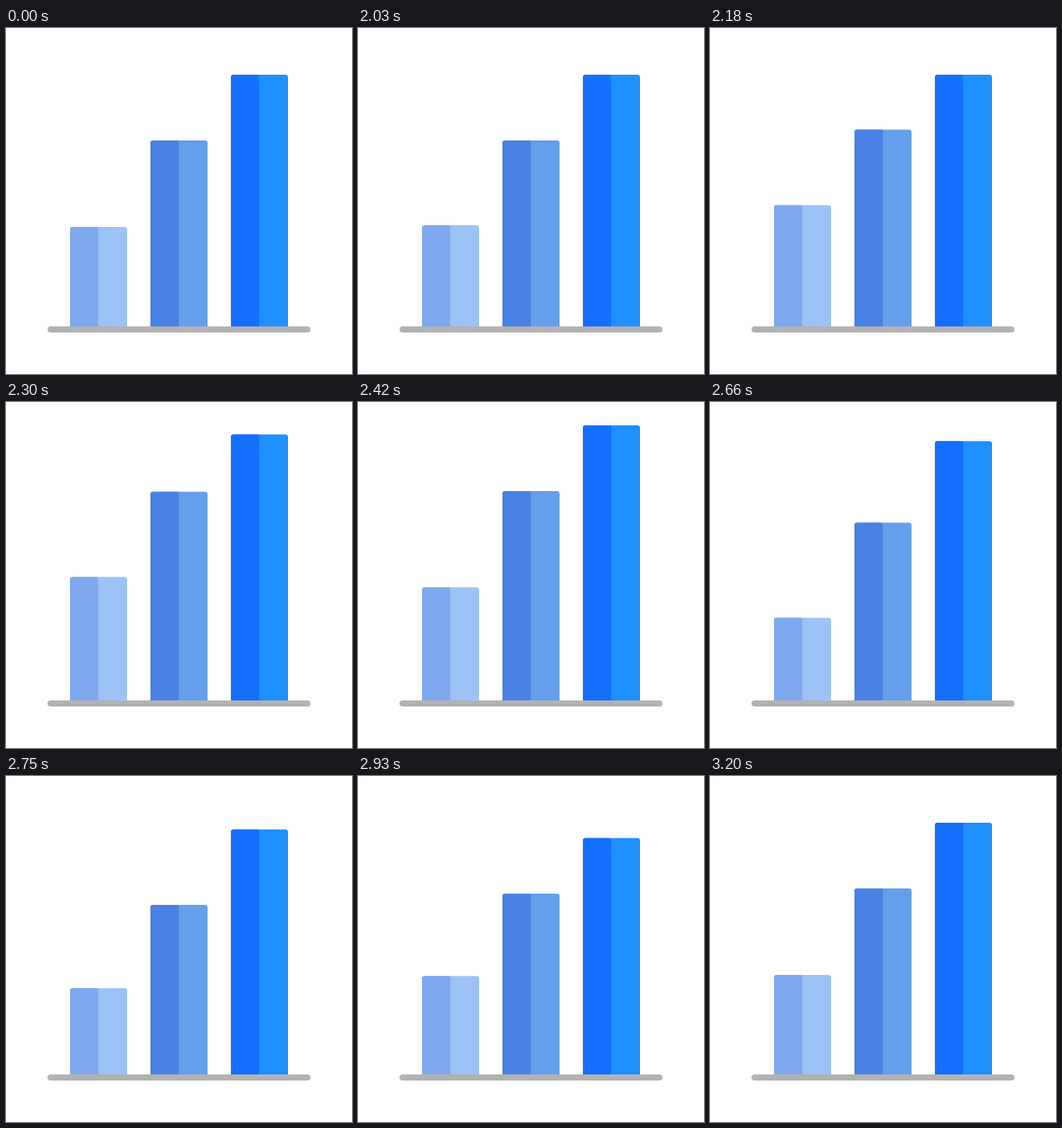
Recreate the animation shown at these times as an HTML page with a canvas. Size 400 by 400 pixels, loop 3230 ms.

```html
<!DOCTYPE html>
<html lang="en">
<head>
<meta charset="utf-8">
<title>Bar chart</title>
<style>
  html, body { margin: 0; height: 100%; overflow: hidden; background: #fff; }
  canvas { display: block; }
</style>
</head>
<body>
<canvas id="stage" width="400" height="400"></canvas>
<script>
const ctx = document.getElementById('stage').getContext('2d');
const LOOP = 3230, STEP = 30, FLOOR = 346;

const bars = [
  { x: 74, top: 230, start: 2000, dark: '#7ea9ee', light: '#9dc2f5' },
  { x: 167, top: 130, start: 2100, dark: '#4982e4', light: '#669eeb' },
  { x: 260, top: 54, start: 2200, dark: '#146fff', light: '#1e90ff' }
];

// Each bar stretches up, dips below its height, then settles.
const keys = [
  { t: 0, y: 0, ease: bezier(.25, .23) },
  { t: 285, y: -28, ease: bezier(.37, .63) },
  { t: 685, y: 20, ease: bezier(.25, .23) },
  { t: 1030, y: 0 }
];

// Cubic easing with control points (x1, 0) and (x2, 1).
function bezier(x1, x2) {
  return x => {
    let lo = 0, hi = 1, s;
    for (let i = 0; i < 20; i++) {
      s = (lo + hi) / 2;
      const r = 1 - s;
      if (3 * r * r * s * x1 + 3 * r * s * s * x2 + s ** 3 < x) lo = s;
      else hi = s;
    }
    return s * s * (3 - 2 * s);
  };
}

function offset(t) {
  const i = keys.findIndex(k => t < k.t);
  if (i < 1) return 0;
  const a = keys[i - 1], b = keys[i];
  return a.y + (b.y - a.y) * a.ease((t - a.t) / (b.t - a.t));
}

function box(x, y, w, h, radii, color) {
  ctx.fillStyle = color;
  ctx.beginPath();
  ctx.roundRect(x, y, w, h, radii);
  ctx.fill();
}

function draw(now) {
  const t = Math.floor((now % LOOP + 10) / STEP) * STEP - 10;
  ctx.clearRect(0, 0, 400, 400);
  for (const { x, top, start, dark, light } of bars) {
    const y = top + offset(t - start);
    box(x, y, 66, FLOOR - y, [3, 3, 0, 0], light);
    box(x, y, 32.7, FLOOR - y, [3, 1.5, 0, 0], dark);
  }
  box(48, 345, 304, 7, 3.5, '#b2b2b2');
}

function tick() {
  draw(performance.now());
  requestAnimationFrame(tick);
}
tick();
</script>
</body>
</html>
```
